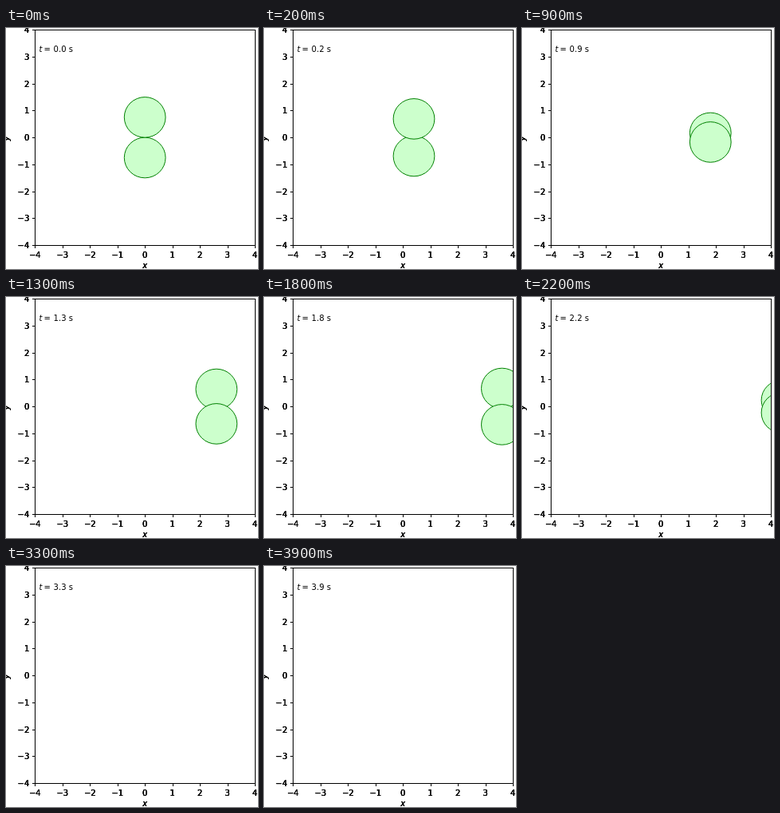
An HTML page with a canvas for the animation above (4000 ms loop, 316x302 px).

```html
<!DOCTYPE html>
<html lang="en">
<head>
<meta charset="utf-8">
<title>Two circles</title>
<style>
  html, body { margin: 0; width: 316px; height: 302px; overflow: hidden; background: #fff; }
  canvas { display: block; }
</style>
</head>
<body>
<canvas id="plot" width="316" height="302"></canvas>
<script>
  const ctx = document.getElementById('plot').getContext('2d');
  const LOOP = 4000, STEP = 100;
  const AXES = { left: 36, top: 2, width: 276, height: 270 };
  const UNIT_X = AXES.width / 8, UNIT_Y = AXES.height / 8;
  const FONT = '10px "DejaVu Sans", sans-serif';
  const px = x => 174.2 + x * UNIT_X;
  const py = y => 137.2 - y * UNIT_Y;

  function text(str, x, y, { align = 'left', italic = false, passes = 1 } = {}) {
    ctx.font = (italic ? 'italic ' : '') + FONT;
    ctx.textAlign = align;
    ctx.fillStyle = '#000';
    // repeated passes thicken the soft edges
    for (let i = 0; i < passes; i++) ctx.fillText(str, x, y);
  }

  function disc(x, y) {
    ctx.beginPath();
    ctx.ellipse(px(x), py(y), 0.75 * UNIT_X, 0.75 * UNIT_Y, 0, 0, 2 * Math.PI);
    ctx.fillStyle = '#ccffcc';
    ctx.fill();
    ctx.strokeStyle = '#008000';
    ctx.lineWidth = 1;
    ctx.stroke();
  }

  function drawAxes() {
    const { left, top, width, height } = AXES;
    const bottom = top + height;
    ctx.strokeStyle = '#000';
    ctx.lineWidth = 1;
    ctx.strokeRect(left + 0.5, top + 0.5, width, height);
    ctx.fillStyle = '#000';
    for (let v = -4; v <= 4; v++) {
      const label = String(v).replace('-', '\u2212');
      const x = Math.round(left + (v + 4) * UNIT_X);
      const y = Math.round(bottom - (v + 4) * UNIT_Y);
      ctx.fillStyle = '#000';
      ctx.fillRect(x, bottom + 1, 1, 3);
      ctx.fillRect(left - 3, y, 3, 1);
      text(label, left + 0.3 + (v + 4) * UNIT_X, 288, { align: 'center', passes: 4 });
      text(label, 29.3, y + 4, { align: 'right', passes: 4 });
    }
    text('x', 174.2, 301, { align: 'center', italic: true, passes: 4 });
    ctx.save();
    ctx.translate(4, 138.5);
    ctx.rotate(-Math.PI / 2);
    text('y', 0, 0, { align: 'center', italic: true, passes: 4 });
    ctx.restore();
  }

  function draw(t) {
    ctx.fillStyle = '#fff';
    ctx.fillRect(0, 0, 316, 302);

    ctx.save();
    ctx.beginPath();
    ctx.rect(AXES.left, AXES.top, AXES.width + 1, AXES.height + 1);
    ctx.clip();
    const x = 2 * t, y = 0.75 * Math.cos(2 * t);
    disc(x, -y);
    disc(x, y);
    ctx.restore();

    drawAxes();
    text('t', 41.6, 30, { italic: true });
    text('=', 47.6, 30);
    text(t.toFixed(1), 59.6, 30);
    text('s', 78.8, 30);
  }

  const start = performance.now();
  function tick() {
    const ms = Math.max(0, performance.now() - start) % LOOP;
    draw(Math.floor(ms / STEP) * STEP / 1000);
    requestAnimationFrame(tick);
  }
  tick();
</script>
</body>
</html>
```
